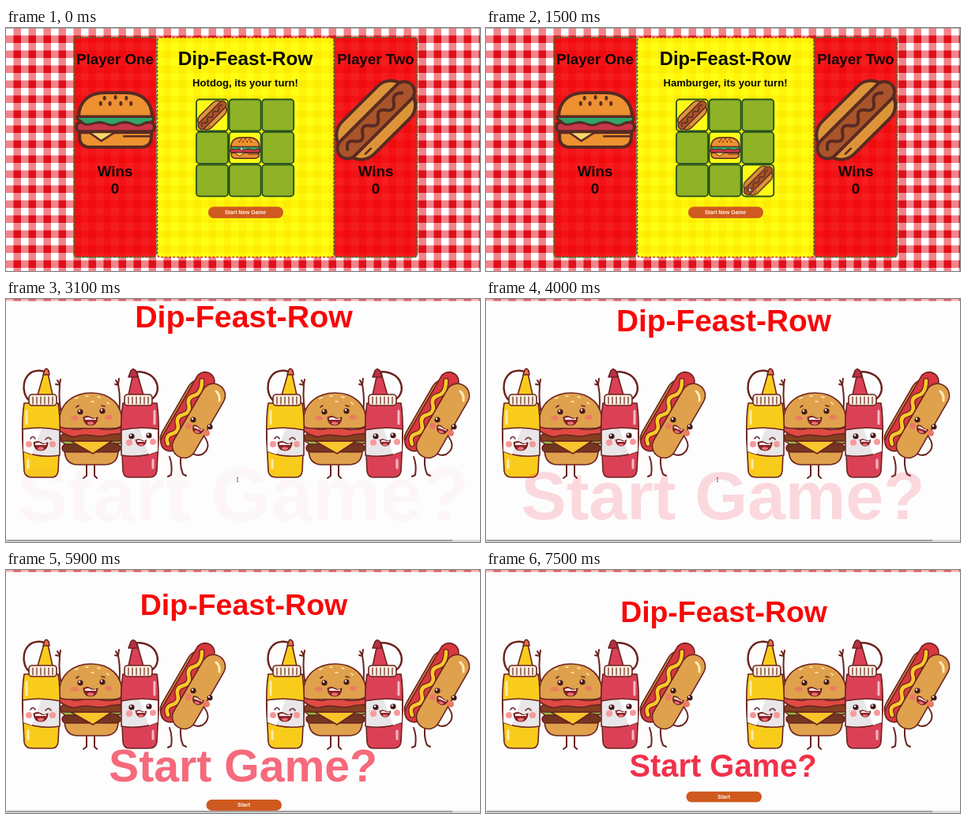
An HTML page that plays this animation: 600x308 px, repeating every 7.6 s.

```html
<!DOCTYPE html>
<html lang="en">
<head>
<meta charset="utf-8">
<title>Snack game</title>
<style>
  html, body { margin: 0; width: 100%; height: 100%; overflow: hidden; background: #fff; }
  svg { display: block; width: 100vw; height: 100vh; }
  text { font-family: "Liberation Sans", Arial, sans-serif; font-weight: bold; text-anchor: middle; }
  .move { animation: 7600ms linear infinite; }
  .cut { animation: 7600ms step-end infinite; }

  .game { animation-name: game; }
  .start { animation-name: start; }
  .before { animation-name: before; }
  .after { animation-name: after; }
  .heading { animation-name: heading; }
  .title { animation-name: title; }
  .ask { animation-name: ask; }
  .go { animation-name: go; }
  .hand { animation-name: hand; }
  .beam { animation-name: beam; }

  @keyframes game { 0% { visibility: visible } 35.53%, 100% { visibility: hidden } }
  @keyframes start { 0% { visibility: hidden } 35.53%, 100% { visibility: visible } }
  @keyframes before { 0% { opacity: 1 } 10.53%, 100% { opacity: 0 } }
  @keyframes after { 0% { opacity: 0 } 10.53%, 100% { opacity: 1 } }
  @keyframes beam { 0% { opacity: 1 } 56%, 100% { opacity: 0 } }

  @keyframes heading {
    0% { font-size: 24.4px }
    19.74% { font-size: 23.8px }
    32.9%, 100% { font-size: 23.5px }
  }
  @keyframes title {
    0%, 35.53% { font-size: 39.6px; transform: translateY(34px) }
    52.63% { font-size: 38.9px; transform: translateY(41px) }
    63.16% { font-size: 38.3px; transform: translateY(47px) }
    77.63% { font-size: 37.5px; transform: translateY(56.5px) }
    98.7%, 100% { font-size: 37.4px; transform: translateY(66px) }
  }
  @keyframes ask {
    0%, 35.53% { font-size: 101px; opacity: 0; transform: translateY(281px) }
    43.42% { font-size: 94px; opacity: .05; transform: translateY(280.5px) }
    52.63% { font-size: 86px; opacity: .18; transform: translateY(279px) }
    63.16% { font-size: 75px; opacity: .41; transform: translateY(276px) }
    77.63% { font-size: 57.2px; opacity: .72; transform: translateY(268px) }
    98.7%, 100% { font-size: 39.9px; opacity: 1; transform: translateY(262px) }
  }
  @keyframes go {
    0%, 35.53% { transform: translateY(318px) }
    52.63% { transform: translateY(309px) }
    63.16% { transform: translateY(302px) }
    77.63% { transform: translateY(291px) }
    98.7%, 100% { transform: translateY(280.5px) }
  }
  @keyframes hand {
    0% { transform: translate(297px, 150px) }
    8%, 12% { transform: translate(338px, 200px) }
    19.74% { transform: translate(333px, 202px) }
    31%, 100% { transform: translate(302px, 233px) }
  }
</style>
</head>
<body>
<svg viewBox="0 0 600 308" preserveAspectRatio="none">
  <defs>
    <pattern id="cloth" width="19" height="19" patternUnits="userSpaceOnUse">
      <rect width="19" height="19" fill="#fff"/>
      <path d="M9.5 0H19V19H0V9.5H9.5z" fill="#f1848a"/>
      <path d="M9.5 9.5H19V19H9.5z" fill="#de0f1b"/>
    </pattern>

    <!-- icons for the game pieces -->
    <symbol id="burger" viewBox="0 0 104 76" overflow="visible">
      <g stroke="#582a22" stroke-width="4" stroke-linejoin="round" stroke-linecap="round">
        <path d="M5 34C5 13 20 3 38 3H66C84 3 99 13 99 34Z" fill="#ee9130"/>
        <path d="M6 54H98V60Q98 73 84 73H20Q6 73 6 60Z" fill="#ee9130"/>
        <path d="M14 51H56L34 65Z" fill="#fbd76c" stroke-width="2.5"/>
        <rect x="2" y="41" width="100" height="12" rx="6" fill="#c9364a"/>
        <path d="M3 34H101Q102 41 94 41C87 41 88 46 80 45S70 40 62 41 52 47 43 44 32 40 26 42 12 45 9 41 2 39 3 34Z" fill="#2fa568" stroke-width="3"/>
        <path d="M63 59H96" stroke-width="2.5"/>
      </g>
      <path d="M38 9v2M52 8v2M66 9v2M33 16v2M45 16v2M59 16v2M72 16v2" stroke="#582a22" stroke-width="4" stroke-linecap="round"/>
    </symbol>
    <symbol id="dog" viewBox="0 0 104 104" overflow="visible">
      <g transform="translate(52 52) rotate(-45)" stroke="#582a22" stroke-width="4" stroke-linecap="round" stroke-linejoin="round">
        <rect x="-56" y="-29" width="112" height="58" rx="24" fill="#dd9438"/>
        <rect x="-64" y="-13" width="128" height="26" rx="13" fill="#a9542a"/>
        <path d="M-52 1Q-45 -10 -38 0T-24 0 -10 0 4 0 18 0 32 0 48 -1" fill="none"/>
        <path d="M-40 21H-30" stroke-width="2.5"/>
      </g>
    </symbol>

    <!-- cartoon snacks -->
    <g id="cheer">
      <path d="M-9 -3q5 -3 9 0t9 0q-1 10 -9 10t-9 -10Z" fill="#8e2328" stroke-width="1.2"/>
      <path d="M-7 -2q4 -2 7 0t7 0v2h-14z" fill="#fff" stroke="none"/>
      <ellipse cy="4.5" rx="4" ry="2" fill="#ee7077" stroke="none"/>
    </g>
    <g id="eye" stroke="none">
      <circle r="3.6" fill="#48191a"/>
      <circle cx="-1" cy="-1.2" r="1.2" fill="#fff"/>
    </g>
    <g id="bottle">
      <path d="M23 132Q20 150 21 178L23 218Q24 226 33 226H58Q65 226 66 218L68 175Q69 150 66 132Z"/>
      <path d="M40 122L48 94Q50 88 53 94L59 122Z"/>
      <rect x="29" y="121" width="35" height="14" rx="4" fill="#fff1de"/>
      <path d="M34 124v9M39 124v9M44 124v9M49 124v9M54 124v9M59 124v9" stroke-width="1.2"/>
      <path d="M21 165Q44 161 68 166V198Q43 202 22 193Z" fill="#e9e6e8"/>
      <path d="M22 166l23 -2 -12 33 -11 -4z" fill="#fff" stroke="none"/>
      <path d="M26 142v16M28 204v10" stroke="#fff" stroke-opacity=".65" stroke-width="3"/>
    </g>
    <g id="band" stroke="#6b2320" stroke-width="1.6" stroke-linecap="round" stroke-linejoin="round">
      <!-- burger -->
      <g fill="none" stroke-width="2">
        <path d="M72 152Q66 135 68 108l-3 -5M68 108l1 -6M68 109l-5 -1"/>
        <path d="M142 150Q146 130 142 108l-3 -5M142 108l1 -7M142 109l-4 -1"/>
        <path d="M102 207v17l-4 3M112 207v17l3 3"/>
      </g>
      <path d="M74 190H142Q143 210 124 210H91Q74 210 74 190Z" fill="#dfa14c"/>
      <path d="M66 177q8 -8 18 -2t20 0 20 0 25 1q-2 9 -10 7t-15 2 -18 0 -18 1 -22 -9Z" fill="#8fbf49"/>
      <rect x="71" y="184" width="74" height="10" rx="5" fill="#74361f"/>
      <path d="M82 180H134L110 196Z" fill="#fac42b"/>
      <rect x="69" y="171" width="78" height="9" rx="4.5" fill="#84401f"/>
      <path d="M65 165q8 -7 16 -2t18 0 18 0 30 0q2 8 -6 8t-14 2 -18 0 -20 1 -24 -9Z" fill="#df4a42"/>
      <path d="M67 158C67 132 85 119 108 119S148 133 147 158Q146 164 136 164H78Q67 164 67 158Z" fill="#dfa14c"/>
      <path d="M88 126l3 -1M101 123h3M116 124l3 1M128 131l2 2M108 130h3" stroke="#ffebb5"/>
      <use href="#eye" x="94" y="143"/><use href="#eye" x="122" y="142"/>
      <path d="M89 137l3 -2M121 135l4 1" fill="none"/>
      <g fill="#ec7b62" stroke="none"><ellipse cx="87" cy="151" rx="5" ry="3"/><ellipse cx="130" cy="150" rx="5" ry="3"/></g>
      <use href="#cheer" x="107" y="153"/>

      <!-- mustard -->
      <path d="M30 129C18 120 20 93 39 91Q45 90 50 93" fill="none" stroke-width="2.4"/>
      <use href="#bottle" fill="#f9cc1c"/>
      <path d="M47 96L49 90Q51 86 54 91L55 96Z" fill="#e5734a"/>
      <path d="M31 177q3 -5 6 0M50 178q4 -5 7 0" fill="none"/>
      <g fill="#f59a9c" stroke="none"><circle cx="29" cy="184" r="4"/><circle cx="59" cy="184" r="4"/></g>
      <use href="#cheer" x="44" y="185"/>

      <!-- ketchup -->
      <path d="M182 128C198 121 194 97 174 93Q167 91 161 94" fill="none" stroke-width="2.4"/>
      <use href="#bottle" fill="#db4156" transform="matrix(-1 0 0 1 214 0)"/>
      <path d="M155 99L158 91Q161 86 165 92L167 99Z" fill="#b92f44"/>
      <use href="#eye" x="159" y="174"/><use href="#eye" x="181" y="173"/>
      <g fill="#f59a9c" stroke="none"><circle cx="156" cy="182" r="4"/><circle cx="186" cy="181" r="4"/></g>
      <use href="#cheer" transform="translate(171 181) scale(.75)"/>

      <!-- hot dog -->
      <path d="M207 200Q211 210 209 223l-4 2M222 196Q219 210 224 222l4 2M250 173Q262 188 248 197 239 200 234 193M224 179Q211 189 229 190" fill="none" stroke-width="2"/>
      <g transform="translate(235 148) rotate(-60)">
        <rect x="-52" y="-22" width="98" height="31" rx="15" fill="#cf8d3e"/>
        <rect x="-54" y="-19" width="112" height="24" rx="12" fill="#d8383f"/>
        <path d="M-46 -8q7 -9 14 -2t14 0 14 0 14 0 14 0 21 -1" fill="none" stroke-width="7"/>
        <path d="M-46 -8q7 -9 14 -2t14 0 14 0 14 0 14 0 21 -1" fill="none" stroke="#fac82c" stroke-width="4.5"/>
        <rect x="-53" y="-4" width="104" height="30" rx="15" fill="#dfa14c"/>
      </g>
      <path d="M266 117q5 4 4 12" stroke="#ffebb5" stroke-width="3" fill="none"/>
      <use href="#eye" x="237" y="153"/><use href="#eye" x="258" y="162"/>
      <g fill="#ec7b62" stroke="none"><circle cx="231" cy="161" r="4"/><circle cx="254" cy="170" r="4"/></g>
      <use href="#cheer" transform="translate(243 165) rotate(20) scale(.8)"/>
    </g>
  </defs>

  <g class="cut game">
    <rect width="600" height="308" fill="url(#cloth)"/>
    <path d="M0 .5H600" stroke="#8d8080" stroke-opacity=".6"/>
    <g stroke-width="1.6">
      <g fill="#f30a0e" fill-opacity=".92" stroke="#3f7a2c" stroke-dasharray="4 1">
        <rect x="86" y="12" width="104" height="278.5" rx="4"/>
        <rect x="416" y="12" width="104.5" height="278.5" rx="4"/>
      </g>
      <rect x="191.5" y="12" width="223.5" height="278.5" rx="4" fill="#ff0" fill-opacity=".92" stroke="#c8261c" stroke-dasharray="3 2"/>
    </g>
    <g font-size="18.75" fill="#140607">
      <text x="138" y="45.5">Player One</text>
      <text x="138" y="188">Wins</text>
      <text x="138" y="210">0</text>
      <text x="468" y="45.5">Player Two</text>
      <text x="468" y="188">Wins</text>
      <text x="468" y="210">0</text>
    </g>
    <use href="#burger" x="87" y="79" width="103" height="75"/>
    <use href="#dog" x="416.5" y="65" width="103.5" height="103.5"/>

    <text class="move heading" x="303" y="47" fill="#0a0a00">Dip-Feast-Row</text>
    <g font-size="13.1" fill="#0a0a00">
      <text class="cut before" x="303" y="73.5">Hotdog, its your turn!</text>
      <text class="cut after" x="303" y="73.5">Hamburger, its your turn!</text>
    </g>

    <g id="board" stroke="#26501f" stroke-width="1.8"></g>
    <use href="#dog" x="242" y="91.5" width="38" height="38"/>
    <use href="#burger" x="283" y="137.5" width="39.5" height="29"/>
    <use class="cut after" href="#dog" x="325.5" y="174.5" width="38" height="38"/>

    <rect x="256" y="226.5" width="95" height="14.5" rx="7" fill="#cf5a20"/>
    <text x="303" y="236.2" font-size="6.8" fill="#fff0e4">Start New Game</text>
    <path class="move hand" d="M0 0q.8 -.7 1 .3v1.400l1.700 .5v1.600l-.7 1h-1.700l-1.200 -2 .9 -.2z" fill="#fff" stroke="#222" stroke-width=".6"/>
  </g>

  <g class="cut start">
    <rect width="600" height="308" fill="#fdfdfd"/>
    <path d="M0 1.2H600" stroke="#f4b5b8" stroke-width="2.4"/>
    <path d="M9.5 1.2H600" stroke="#d5646c" stroke-width="2.4" stroke-dasharray="9.5"/>
    <use href="#band"/>
    <use href="#band" x="309"/>
    <text class="move title" x="301" fill="#f70808">Dip-Feast-Row</text>
    <text class="move ask" x="300" fill="#f23049">Start Game?</text>
    <path class="cut beam" d="M292 226.5h2M293 226.5v5M292 231.5h2" stroke="#555" stroke-width=".8"/>
    <g class="move go">
      <rect x="253.5" width="95.5" height="14" rx="7" fill="#cf5a20"/>
      <text x="301" y="9.4" font-size="7" fill="#fff0e4">Start</text>
    </g>
    <path d="M0 306.5H600" stroke="#dcdcdc" stroke-width="3"/>
    <path d="M1 306H565" stroke="#a2a2a2" stroke-width="2"/>
  </g>
</svg>
<script>
  const board = document.getElementById("board");
  const played = [0, 4];
  const last = 8;

  function addCell(i, fill, cls) {
    const cell = document.createElementNS(board.namespaceURI, "rect");
    const props = {
      x: 241 + (i % 3) * 41.6, y: 90.5 + Math.floor(i / 3) * 41.4,
      width: 40, height: 40, rx: 4, fill, class: cls
    };
    for (const key in props) cell.setAttribute(key, props[key]);
    board.append(cell);
  }

  for (let i = 0; i < 9; i++) {
    addCell(i, played.includes(i) ? "#fdfa16" : "#8fb226", "");
  }
  addCell(last, "#fdfa16", "cut after");
</script>
</body>
</html>
```
